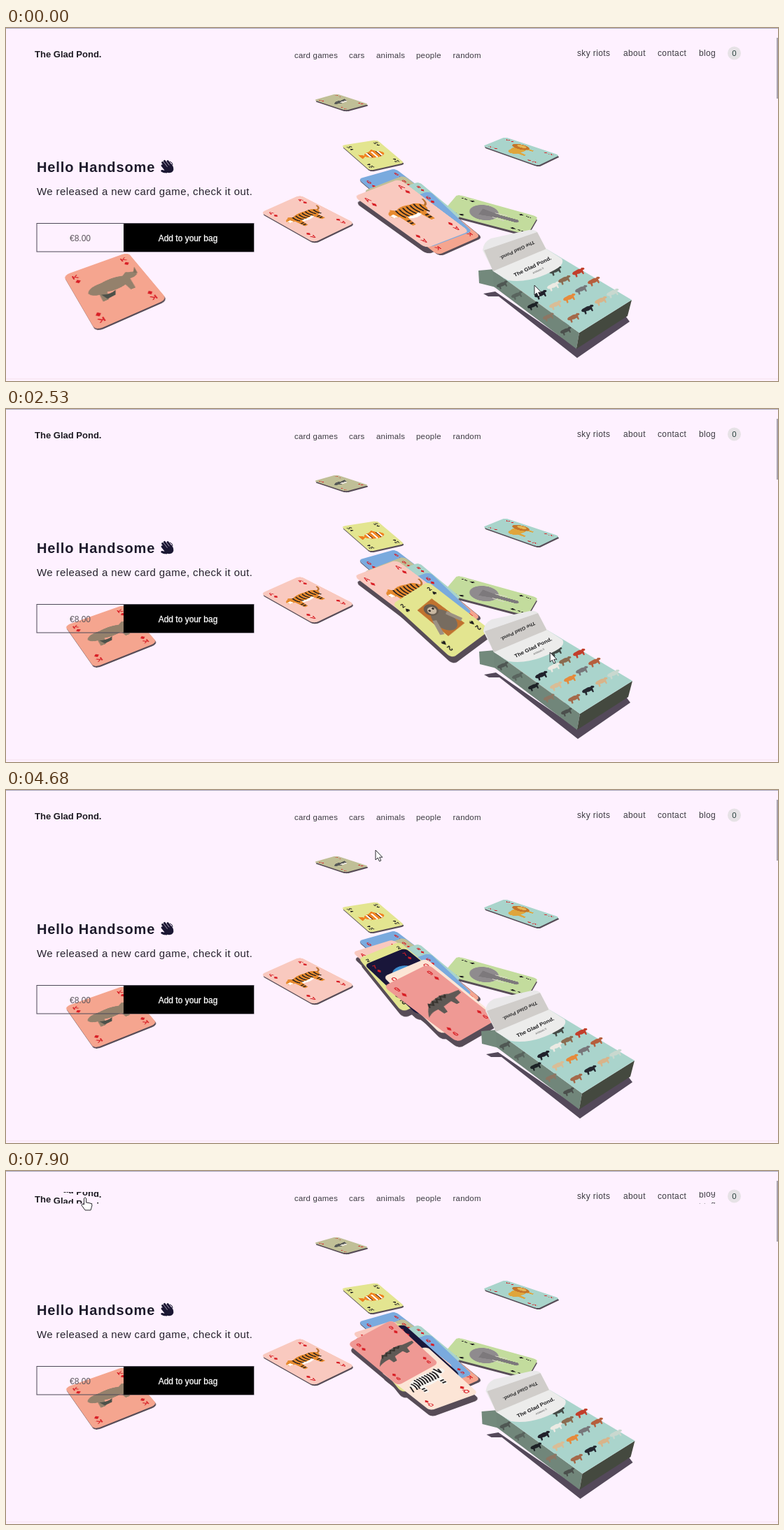
An HTML page that plays this animation: 1103 by 505 pixels, repeating every 8000 ms.

```html
<!DOCTYPE html>
<html lang="en">
<head>
<meta charset="utf-8">
<title>Card game shop</title>
<style>
  html, body { margin: 0; width: 100%; height: 100%; overflow: hidden; background: #fef1ff; }
  #stage { position: absolute; inset: 0; overflow: hidden; }
  #stage svg { position: absolute; left: 0; top: 0; overflow: visible; transform-origin: 0 0; }
  text { font-family: "Liberation Sans", Arial, sans-serif; white-space: pre; }
  .suit { font-family: "DejaVu Sans", sans-serif; }
</style>
</head>
<body>
<div id="stage"></div>
<script>
const LOOP = 8000, W = 100, H = 140, ROLL = 17;
const BRAND = 'The Glad Pond.';
const stage = document.getElementById('stage');
const nums = s => s.trim().split(/\s+/).map(Number);

// Value list at time t from rows of [time, ...values], eased between rows.
function at(keys, t) {
  const n = keys.findIndex(k => k[0] > t);
  if (n === 0) return keys[0].slice(1);
  if (n < 0) return keys[keys.length - 1].slice(1);
  const a = keys[n - 1], b = keys[n], u = (t - a[0]) / (b[0] - a[0]);
  const e = u * u * (3 - 2 * u);
  return a.slice(1).map((v, i) => v + (b[i + 1] - v) * e);
}

// Perspective map of a W x H card onto four screen corners.
function warp([x0, y0, x1, y1, x2, y2, x3, y3], ox = 0, oy = 0) {
  const ax = x1 - x2, bx = x3 - x2, sx = x0 - x1 + x2 - x3;
  const ay = y1 - y2, by = y3 - y2, sy = y0 - y1 + y2 - y3;
  const den = ax * by - bx * ay;
  const g = (sx * by - bx * sy) / den, h = (ax * sy - sx * ay) / den;
  const m = [(x1 - x0 + g * x1) / W, (y1 - y0 + g * y1) / W, 0, g / W,
             (x3 - x0 + h * x3) / H, (y3 - y0 + h * y3) / H, 0, h / H,
             0, 0, 1, 0, x0, y0, 0, 1];
  return `translate(${ox}px,${oy}px) matrix3d(${m.map(v => v.toFixed(7))})`;
}

// ---------- animals, in card units ----------
const BEAST = 'M16 63Q20 50 38 51Q56 46 70 53L77 47L81 50Q92 53 89 62Q82 67 77 65L75 90H68L66 75Q50 80 39 75L35 92H27L28 75Q18 73 16 63Z';
const beast = (fill, extra = '') => `<path d="${BEAST}" fill="${fill}"/>${extra}`;
const stripes = (color, step, wide) => {
  let d = '';
  for (let x = 22; x < 76; x += step) d += `M${x} ${x < 30 ? 57 : 52}q4 9-1 19`;
  return `<path d="${d}M28 80h7M28 86h7M68 79h7M68 85h7" fill="none" stroke="${color}" stroke-width="${wide}"/>`;
};
const ellipse = (x, y, rx, ry, fill) => `<ellipse cx="${x}" cy="${y}" rx="${rx}" ry="${ry}" fill="${fill}"/>`;
const art = {
  none: '',
  tiger: `<g transform="matrix(-1 0 0 1 102 0)">${beast('#e68a2e',
    '<path d="M38 75Q50 81 66 75L64 70Q50 74 40 70ZM81 57l8 1-2 6-8 1Z" fill="#fff"/>' + stripes('#2b211d', 8, 3))}
    <path d="M17 62Q8 60 7 49" fill="none" stroke="#b9712c" stroke-width="3"/></g>`,
  rhino: beast('#94816c', '<path d="M86 55L93 42L91 60Z" fill="#85735f"/><path d="M30 76Q40 84 50 78L46 88L34 90Z" fill="#4c5149"/>'),
  fish: ellipse(52, 70, 27, 17, '#f08522') +
    '<path d="M28 70L13 58V82ZM45 54l12-10 8 12Z" fill="#ee7f1d"/><path d="M36 58v24M52 54v32M68 57v26" stroke="#fff" stroke-width="5"/><path d="M40 57v26M64 56v28" stroke="#3a2617" stroke-width="2"/>',
  lion: beast('#dfa53c', ellipse(72, 58, 17, 20, '#c4742a') + ellipse(77, 58, 9, 11, '#e4b454')),
  elephant: ellipse(50, 56, 37, 23, '#8f8b8e') +
    '<path d="M34 50H66L58 80V112Q50 118 43 112V80Z" fill="#7d797c"/><path d="M39 72L36 92M61 72L64 92" stroke="#d9d5c9" stroke-width="3"/>',
  seal: '<path d="M20 72Q40 50 62 58L82 54L74 72Q50 88 20 72Z" fill="#575a58"/>' + ellipse(58, 74, 14, 6, '#e6e2d6'),
  sloth: `<path d="M28 38L72 34L76 106L30 108Z" fill="#c0722f"/>${ellipse(52, 80, 20, 25, '#776c60')}
    ${ellipse(50, 52, 14, 13, '#665a4e')}${ellipse(50, 54, 9, 8, '#c9b8a2')}<path d="M44 52h4M53 52h4" stroke="#382e28" stroke-width="4"/>
    <path d="M36 72L24 100M68 72L78 98" stroke="#9c9184" stroke-width="8"/>`,
  bird: `<path d="M42 66H60L66 112H36Z" fill="#6d6870"/>${ellipse(50, 54, 24, 18, '#3f8fd0')}
    <path d="M28 60Q50 44 73 60" fill="none" stroke="#a6dcec" stroke-width="4"/><path d="M36 50h28" stroke="#235f9f" stroke-width="4"/>`,
  zebra: beast('#f7f4ef', stripes('#1d1a1c', 5.5, 2.8) +
    '<path d="M77 48l4 14M83 52l-1 11M16 62L11 78" stroke="#1d1a1c" stroke-width="2.6"/>'),
  croc: '<path d="M6 80Q24 58 46 57Q66 54 76 60L97 62L96 68L78 71L76 82H69L66 73L46 75L42 86H34L33 75Q18 74 6 80Z" fill="#5e5955"/><path d="M24 66l5-6 5 5 5-6 5 5 5-6 5 5 5-6 5 5 5-4" fill="none" stroke="#38342f" stroke-width="3"/>'
};

// ---------- cards ----------
const RED = '#d81e25', BLACK = '#1d1b1d';
const corner = (rank, suit, ink) => [[13, 19, 0], [87, 19, 0], [13, 121, 180], [87, 121, 180]].map(([x, y, r]) =>
  `<g transform="translate(${x} ${y}) rotate(${r})" fill="${ink}" text-anchor="middle">
  <text font-size="13" font-weight="700">${rank}</text><text class="suit" y="13" font-size="13">${suit}</text></g>`).join('');

const cards = [];
function card(fill, pic, rank, suit, ink, drop, ...keys) {
  cards.push({ fill, drop, keys: keys.map(nums), face: art[pic] + corner(rank, suit, ink) });
}
const THIN = [1, 2], PILE = [2, 9];
const BOXED = ' 706 352 770 322 850 385 790 425';

card('#f5a58f', 'rhino', 'K', '♦', RED, THIN, '0 82 354 174 321 230 388 128 433', '600 78 328 169 297 222 358 123 399',
  '1020 82 310 167 281 215 337 124 373', '2530 84 310 169 280 216 334 126 370');
card('#c0bf97', 'seal', '9', '♦', RED, THIN, '0 440 103 472 94 518 109 485 118');
card('#e3e590', 'fish', '10', '♠', BLACK, THIN, '0 479 168 530 160 569 193 520 204');
card('#a9d4cb', 'lion', 'K', '♦', RED, THIN, '0 681 169 713 156 791 182 760 197');
card('#f9c9bf', 'tiger', 'A', '♦', RED, THIN, '0 364 264 420 239 498 279 440 307');
card('#c3dc9d', 'elephant', 'J', '♠', BLACK, [0, 3], '0 623 264 645 238 760 270 745 296');
card('#7aaade', 'none', '6', '♦', RED, [0, 1], '0 503 216 556 201 640 265 590 290');
card('#c0bf97', 'none', '9', '♦', RED, [0, 1], '0 511 233 568 211 640 265 590 290');
card('#a9d4cb', 'none', '8', '♦', RED, [0, 1], '0 530 240 590 220 650 270 600 300');
card('#f5a58f', 'none', 'K', '♦', RED, [3, 2], '0 535 260 602 236 678 298 617 325');
card('#7aaade', 'none', '6', '♦', RED, [1, 2], '0 535 258 605 233 666 291 605 314');
card('#f9c9bf', 'tiger', 'A', '♦', RED, PILE, '0 497 241 562 216 662 291 600 315', '2530 497 239 558 216 657 290 596 314',
  '4020 497 235 555 217 645 282 580 308', '4680 495 232 553 214 640 280 575 305');
card('#e3e590', 'sloth', '2', '♠', BLACK, PILE, '2150' + BOXED, '2530 552 279 603 247 692 316 637 357',
  '2950 520 256 577 229 667 297 602 330', '4020 510 249 567 225 645 288 575 322', '4680 504 241 562 217 640 283 566 318');
card('#19163a', 'bird', '7', '♦', RED, PILE, '2850' + BOXED, '3300 553 284 610 255 700 320 640 358',
  '4020 520 262 582 234 664 303 602 334', '4680 512 250 570 226 650 290 588 322', '5890 507 241 568 219 650 292 578 319');
card('#fce5d6', 'zebra', 'Q', '♦', RED, PILE, '3650' + BOXED, '4020 573 291 640 265 735 340 674 377',
  '4680 539 267 600 241 690 315 622 350', '5890 540 283 606 243 681 302 612 336', '7900 535 287 600 250 675 318 606 343');
card('#ef9994', 'croc', '9', '♦', RED, PILE, '4380' + BOXED, '4680 539 281 603 249 702 328 645 361',
  '5350 497 244 559 221 632 279 575 311', '5890 495 240 557 220 627 275 570 306', '7900 488 247 551 213 618 275 560 307');

function layer(content) {
  stage.insertAdjacentHTML('beforeend', `<svg width="${W}" height="${H}">${content}</svg>`);
  return stage.lastElementChild;
}
const sheet = fill => `<rect width="${W}" height="${H}" rx="9" fill="${fill}"/>`;
cards.forEach(c => c.shade = layer(sheet('#574c57')));
cards.forEach(c => c.top = layer(sheet(c.fill) + c.face));

// ---------- box ----------
const animal = (x, y, fill, s = 1) =>
  `<path d="${BEAST}" fill="${fill}" transform="translate(${x} ${y}) scale(${s}) matrix(.24 -.1 .1 .2 -19 -9)"/>`;
const printed = `765 382 #20212b,783 370 #eceae3,799 361 #8b6b50,819 350 #c23e2b,823 375 #77777a,806 387 #e58a3c,
  786 397 #d9bd96,832 403 #252830,851 391 #d8b48a,868 380 #c9d8cf,812 415 #a4694a,786 348 #444b47,841 363 #b65f3d`;
const sidePrints = '710 368 #4f5753,731 383 #59645e,754 398 #1d2226,776 414 #8d7663,801 434 #4c504d';
const prints = (list, s) => list.split(',').map(p => { const [x, y, f] = p.trim().split(' '); return animal(x, y, f, s); }).join('');
const poly = (points, fill) => `<polygon points="${points}" fill="${fill}"/>`;

const box = `<g id="box">
  ${poly('683,380 700,377 816,457 886,412 892,420 817,472 705,384 690,384', '#54495a')}
  ${poly('676,347 699,345 701,371 677,365', '#73897c')}
  ${poly('697,347 820,436 816,459 698,370', '#71867a')}
  ${poly('820,436 895,389 889,412 816,459', '#44493f')}
  ${poly('697,347 773,316 895,389 820,436', '#aad4cc')}
  ${prints(printed, 1)}${prints(sidePrints, .9)}
  <path d="M682 318Q683 306 694 301L748 289Q757 288 760 292L773 317L697 348Z" fill="#e9e8e9"/>
  ${poly('684,318 760,292 773,317 697,348', '#d0cdca')}
  <path d="M697 348L773 316L795 330Q800 338 785 346Q750 366 718 361Z" fill="#ececeb"/>
  <text transform="matrix(.9 -.43 .42 .8 728 356)" font-size="8" font-weight="700" fill="#1c1c1e">${BRAND}</text>
  <text transform="matrix(.9 -.43 .42 .8 754 352)" font-size="4" fill="#555">ANIMALS</text>
  <text transform="matrix(-.88 .42 -.3 -.85 755 304)" font-size="7.6" font-weight="700" fill="#2b2b2c">${BRAND}</text></g>`;

// ---------- links whose letters roll while hovered ----------
const words = [];
function word(text, x, y, size, hovers = [], more = '', stagger = 20, span = 250) {
  words.push({ text, x, y, hovers, stagger, span, attrs: `x="${x}" font-size="${size}" ${more}` });
}
const nav = 'letter-spacing=".2" fill="#3d3b42"', side = 'letter-spacing=".35" fill="#3d3b42"';
word(BRAND, 41, 42, 13, [[7760, 9000]], 'font-weight="700" fill="#1d1b22"', 9, 300);
word('card games', 412, 43, 11.5, [[5520, 5600]], nav);
word('cars', 490, 43, 11.5, [[5640, 5775]], nav);
word('animals', 529, 43, 11.5, [[5920, 6150]], nav);
word('people', 586, 43, 11.5, [[6250, 6450]], nav);
word('random', 638.5, 43, 11.5, [[6560, 6760]], nav);
word('sky riots', 816, 39.5, 12, [[7130, 7230]], side);
word('about', 882, 39.5, 12, [[5200, 5250], [7270, 7340]], side);
word('contact', 931, 39.5, 12, [[5150, 5200], [7370, 7440]], side);
word('blog', 990, 39.5, 12, [[5080, 5130], [7470, 7520], [7660, 7750]], side);

const easeOut = u => 1 - (1 - Math.min(1, Math.max(0, u))) ** 3;
function rolled(w, i, t) {
  return Math.max(0, ...w.hovers.map(([a, b]) => Math.min(
    easeOut((t - a - i * w.stagger) / w.span), 1 - easeOut((t - b - i * w.stagger) / w.span))));
}

const wave = `<g transform="translate(230 199) rotate(-38)" stroke="#1b1733" stroke-linecap="round" fill="#1b1733">
  <path d="M-4 2V-6M-1 0V-9M2.5 0V-9M6 2V-6M-5 5L-9 0" stroke-width="3"/>
  <path d="M-5 0H7.5V4Q6 10 1 10Q-4 9-6 4Z" stroke="none"/></g>
  <path d="M234 191q4 1 4 5M222 203q1 4 5 4" stroke="#1b1733" fill="none"/>`;

stage.insertAdjacentHTML('beforeend', `<svg width="1103" height="505" viewBox="0 0 1103 505">
  <clipPath id="row"><rect y="30" width="1103" height="16.5"/></clipPath>
  <rect width="1103" height="1" fill="#aaa7bd"/>
  <rect y="501.5" width="1103" height="1" fill="#f3e1ee"/>
  <rect x="1101" y="14" width="2" height="87" fill="#aaa3b0"/>
  <g clip-path="url(#row)">${words.map(w => `<text ${w.attrs}>${w.text}</text>`.repeat(2)).join('')}</g>
  <circle cx="1040.5" cy="36" r="9.5" fill="#e6e2e6"/>
  <text x="1040.5" y="40" font-size="11.5" text-anchor="middle" fill="#2d4540">0</text>
  <text x="44" y="206" font-size="20" font-weight="700" letter-spacing=".9" fill="#1e1b2c">Hello Handsome</text>${wave}
  <text x="44" y="239" font-size="15" letter-spacing=".4" fill="#25222c">We released a new card game, check it out.</text>
  <rect x="44" y="279.5" width="310" height="40.5" fill="none" stroke="#4d4957"/>
  <rect x="168" y="280" width="186" height="40" fill="#000"/>
  <text x="106" y="305" font-size="12" text-anchor="middle" fill="#5c555c">€8.00</text>
  <text x="260" y="305" font-size="12" text-anchor="middle" fill="#fff" stroke="#fff" stroke-width=".3">Add to your bag</text>
  ${box}
  <g id="cursor" fill="#fff" stroke="#2a2a30" stroke-linejoin="round">
    <path id="arrow" d="M0 0V14L3.2 11L5.5 16L7.8 15L5.6 10.2H9.8Z"/>
    <path id="hand" d="M-1.5 1Q0-1 1.5 1V7L7 8Q10 8 10 11L8 18H0L-5 11Q-5 8-1.5 10Z"/>
  </g></svg>`);

const $ = id => document.getElementById(id);
const letters = [...document.querySelectorAll('[clip-path] text')];
const boxKeys = ['0 -1 0 0', '1410 0 0 0', '2150 0 0 0', '2340 -8 -3 1.4', '2530 0 0 0', '2850 0 0 0', '3060 -8 -3 1.4', '3300 0 0 0',
  '3650 0 0 0', '3950 -10 -4 1.8', '4020 -10 -4 1.8', '4300 3 -2 0', '4380 3 -2 0', '4530 -5 -3 1', '4680 3 -2 0', '5890 3.5 -3 0'].map(nums);
const cursorKeys = ['0 755 368', '300 880 310', '600 1030 300', '1000 800 345', '1410 778 348', '4020 776 348', '4420 776 348',
  '4680 528 86', '4900 720 40', '5080 1024 36', '5250 860 36', '5450 600 40', '5560 455 38', '5700 500 38', '5890 527 37',
  '6450 620 38', '6760 690 38', '7130 820 36', '7560 1028 36', '7740 1004 36', '7765 125 38', '7900 113 38'].map(nums);

function draw(t) {
  for (const c of cards) {
    const quad = at(c.keys, t);
    c.top.style.transform = warp(quad);
    c.shade.style.transform = warp(quad, ...c.drop);
  }
  const [bx, by, turn] = at(boxKeys, t);
  $('box').setAttribute('transform', `translate(${bx} ${by}) rotate(${turn} 895 389)`);

  words.forEach((w, n) => {
    const ys = [...w.text].map((_, i) => w.y - ROLL * rolled(w, i, t));
    letters[2 * n].setAttribute('y', ys.join(' '));
    letters[2 * n + 1].setAttribute('y', ys.map(y => y + ROLL).join(' '));
  });

  const over = words.some(w => w.hovers.some(([a, b]) => t >= a && t < b));
  $('cursor').setAttribute('transform', `translate(${at(cursorKeys, t).join(' ')})`);
  $('arrow').style.display = over ? 'none' : '';
  $('hand').style.display = over ? '' : 'none';
}

const start = performance.now();
function tick() {
  draw((performance.now() - start) % LOOP);
  requestAnimationFrame(tick);
}
tick();
</script>
</body>
</html>
```
